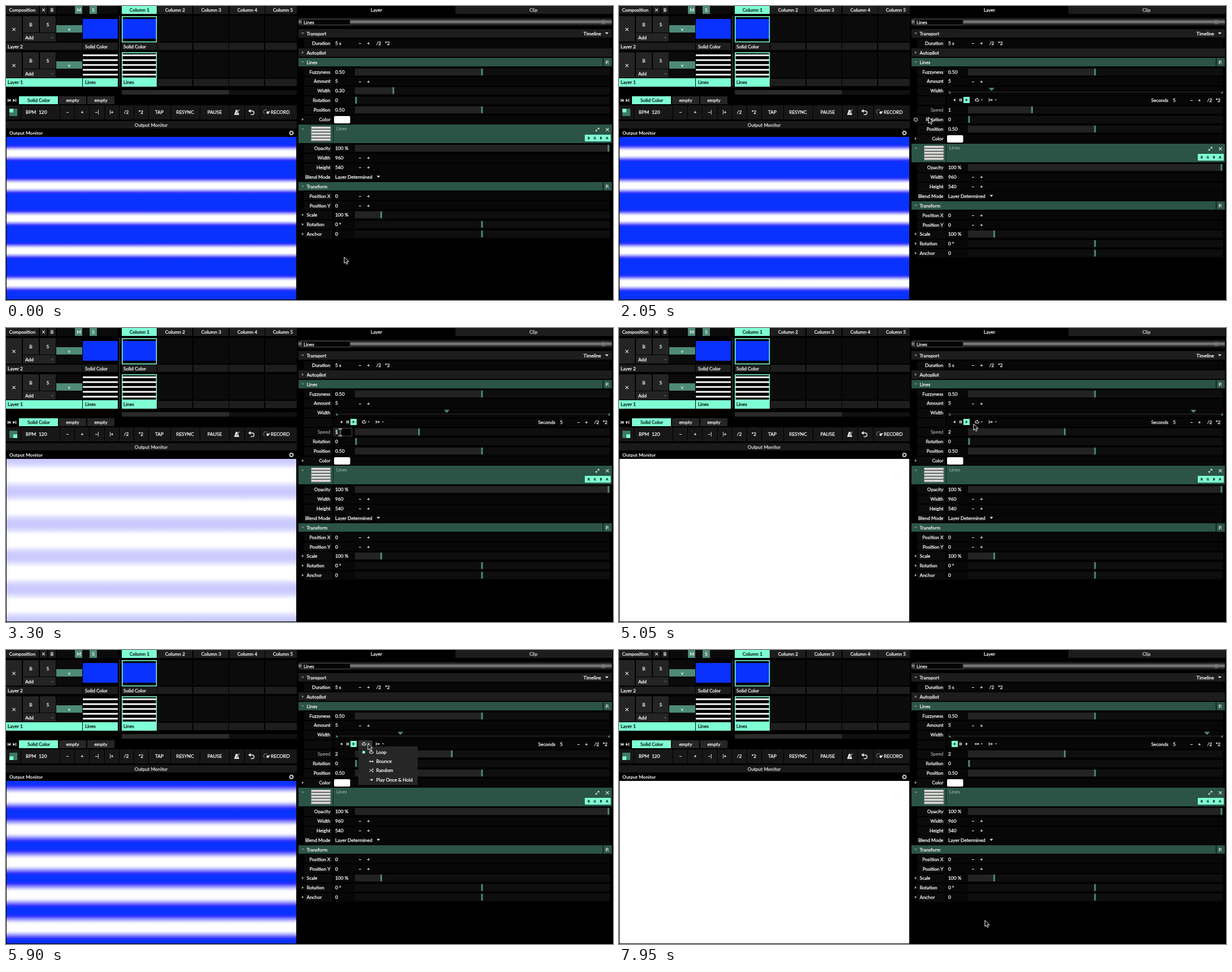
These frames come from a looping animation (1075 px wide and 521 px high, 8 s). An HTML page:

```html
<!DOCTYPE html>
<html lang="en">
<head>
<meta charset="utf-8">
<title>Line width animation</title>
<style>
  html, body { margin: 0; width: 100%; height: 100%; overflow: hidden; background: #000; }
  svg { display: block; }
  text {
    font: 8.35px Lato, "Open Sans", sans-serif;
    fill: currentColor; stroke: currentColor; stroke-width: .36px; white-space: pre;
  }
  .small { font-size: 5.6px; font-weight: 700; }
  .bold { font-weight: 700; font-size: 8.3px; stroke: none; }
</style>
</head>
<body>
<svg id="stage" width="1075" height="521" viewBox="0 0 1075 521"></svg>
<script>
const MINT = '#7fffd4', GREEN = '#4d8a77', HEAD = '#2b5446', GREY = '#1d1d1d', BUTTON = '#242424',
      WHITE = '#e8e8e8', DIM = '#8a8a8a', DARK = '#10241d', BLUE = '#0a32ff';
const LOOP = 8000, STEP = 50, SHIFT = 34;
const TIMELINE_ON = 2025, SPEED_UP = 4330, TURN = 7812, BOUNCE_ON = 6400;

// Drawing helpers
const box = (x, y, w, h, fill, extra = '') =>
  `<rect x="${x}" y="${y}" width="${w}" height="${h}" fill="${fill}" ${extra}/>`;
const label = (x, y, s, color = WHITE, anchor = 'start', cls = '') =>
  `<text x="${x}" y="${y + 3}" color="${color}" text-anchor="${anchor}" class="${cls}">${s}</text>`;
const mid = (x, y, s, color, cls) => label(x, y, s, color, 'middle', cls);
const path = (d, fill, extra = '') => `<path d="${d}" fill="${fill}" ${extra}/>`;
const line = (d, color = WHITE, w = 1) => path(d, 'none', `stroke="${color}" stroke-width="${w}"`);
const group = (id, s) => `<g id="${id}">${s}</g>`;
const down = (x, y, r, color) => path(`M${x - r} ${y - r * .6}h${2 * r}l${-r} ${r * 1.2}z`, color);
const right = (x, y, r, color) => path(`M${x - r * .6} ${y - r}v${2 * r}l${r * 1.4} ${-r}z`, color);
const left = (x, y, r, color) => path(`M${x + r * .6} ${y - r}v${2 * r}l${-r * 1.4} ${-r}z`, color);
const cross = (x, y, r) => line(`M${x - r} ${y - r}l${2 * r} ${2 * r}m0 ${-2 * r}l${-2 * r} ${2 * r}`, WHITE, 1.1);
const gear = (x, y, color) =>
  `<g fill="none" stroke="${color}"><circle cx="${x}" cy="${y}" r="2.6" stroke-width="1.3"/>` +
  `<circle cx="${x}" cy="${y}" r="3.7" stroke-width="1.2" stroke-dasharray="1.45"/></g>`;
const minusPlus = (y, x = 627, gap = 15) => mid(x, y, '−') + mid(x + gap, y, '+');
const swap = (x, y) => line(`M${x - 3} ${y}h6`) + left(x - 2.6, y, 2, WHITE) + right(x + 2.6, y, 2, WHITE);
const loopIcon = (x, y) => line(`M${x + 1} ${y - 2}h-2a2 2 0 0 0 0 4h2a2 2 0 0 0 2 -3`, WHITE, 1.2) +
  right(x + 1, y - 2, 1.8, WHITE);

// White share of the line pattern; d runs 0 at a line's centre to 1 halfway to the next
function edge(d, w) {
  const t = Math.min(1, Math.max(0, (d - .35 * w) / (1.55 * w + 1e-6)));
  return 1 - t * t * (3 - 2 * t);
}
const STOPS = 32;
function stops(w, rgb) {
  let s = '';
  for (let i = 0; i <= STOPS; i++) {
    const d = Math.abs(2 * i / STOPS - 1);
    const a = Math.min(1, edge(d, w) + edge(2 - d, w));
    const c = rgb.map(v => Math.round(Math.max(v, 255 * a)));
    s += `<stop offset="${i / STOPS}" stop-color="rgb(${c})"/>`;
  }
  return s;
}
const stripes = (id, y, h, w, rgb) =>
  `<linearGradient id="${id}" gradientUnits="userSpaceOnUse" x1="0" x2="0" y1="${y}" y2="${y + h / 5}"
    spreadMethod="repeat">${stops(w, rgb)}</linearGradient>`;

const defs = `<defs>${stripes('out', 232, 288, .3, [10, 50, 255])}${stripes('mini', 83, 43, .3, [0, 0, 0])}
  <linearGradient id="bar" x1="0" x2="0" y1="0" y2="1"><stop offset="0" stop-color="#000"/>
  <stop offset=".25" stop-color="#2c2c2c"/><stop offset=".5" stop-color="#888"/>
  <stop offset=".75" stop-color="#2c2c2c"/><stop offset="1" stop-color="#000"/></linearGradient></defs>`;

function layer(y, n, name, thumb, on) {
  const strip = on ? MINT : GREY, ink = on ? DARK : WHITE, ly = on ? y + 46 : y + 47, lh = on ? 15 : 13;
  let s = box(0, y, 28, 45, BUTTON) + cross(14, y + 23.5, 2.6) +
    box(30, y, 28, 29, BUTTON) + mid(44, y + 15, 'B') + box(60, y, 28, 29, BUTTON) + mid(74, y + 15, 'S') +
    box(30, y + 30, 58, 15, BUTTON) + label(34, y + 38, 'Add') + down(82, y + 38.5, 2.3, '#555') +
    box(89, y, 46, 45, '#0b0b0b') + box(89, y + 16, 46, 13, GREEN) + mid(112, y + 22.5, 'v') +
    box(0, ly, 135, lh, strip) + label(3, ly + 7, 'Layer ' + n, ink) +
    box(136, ly, 62, lh, strip) + label(140, ly + 7, name, ink) +
    box(205, ly, 62, lh, strip) + label(208, ly + 7, name, ink) + thumb(136) + thumb(205) +
    box(205.8, y + .8, 60.6, 44.8, 'none', `stroke="${MINT}" stroke-width="1.6"`);
  for (let i = 0; i < 4; i++) {
    const x = Math.round(268 + 63.7 * i), w = Math.min(62, 515 - x);
    s += box(x, y, w, 45, '#0b0b0b') + box(x, y + 47, w, 13, GREY);
  }
  return s;
}

function leftPanel() {
  let s = box(0, 0, 58, 14, GREY) + label(5.5, 7, 'Composition') + box(60, 0, 13, 14, GREY) +
    cross(66.5, 7, 2.3) + box(75, 0, 13, 14, GREY) + mid(81.5, 7, 'B') + box(90, 0, 108, 14, '#0b0b0b') +
    box(122, 0, 13, 14, GREEN) + mid(129, 7, 'M') + box(148, 0, 13, 14, GREEN) + mid(154.5, 7, 'S');
  for (let i = 0; i < 5; i++) {
    const x = Math.round(204.6 + 63.7 * i);
    s += box(x, 0, Math.min(62, 515 - x), 14, i ? GREY : MINT) + mid(x + 31.5, 7, 'Column ' + (i + 1), i ? WHITE : DARK);
  }
  s += layer(18, 2, 'Solid Color', x => box(x, 23, 62, 35, BLUE), false) +
    layer(82, 1, 'Lines', x => box(x, 83, 62, 43, 'url(#mini)'), true) +
    box(200, 17, 2, 126, '#242424') + box(205, 149, 310, 8, '#101010') + box(205, 149, 190, 8, '#2a2a2a');

  // Deck and tempo bars
  s += box(3, 164.5, 1.3, 5.5, WHITE) + left(6.4, 167.2, 2.8, WHITE) +
    right(14, 167.2, 2.8, WHITE) + box(16.8, 164.5, 1.3, 5.5, WHITE) +
    box(23, 160, 69, 14, MINT) + mid(58, 166.5, 'Solid Color', DARK);
  for (const x of [94, 144]) s += box(x, 160, 48, 14, '#262626') + mid(x + 24, 166.5, 'empty');
  s += box(0, 176, 515, 25, '#171717');
  for (const x of [26, 95, 121, 147, 174, 200, 226, 252, 291, 343, 395, 422, 450]) s += box(x, 176, 1, 25, '#000');
  s += box(6, 182, 14, 13, '#3c7a67') + `<rect id="beat" width="7" height="6.5" fill="${MINT}"/>` +
    label(35, 188, 'BPM') + label(58, 188, '120');
  ['−', '+', '−|', '|+', '/2', '*2'].forEach((c, i) => s += mid(109 + 26 * i, 188, c));
  s += mid(271.5, 188, 'TAP') + mid(317, 188, 'RESYNC') + mid(369.5, 188, 'PAUSE') + label(469, 188, 'RECORD') +
    path('M404 193l3-9h3l3 9z', WHITE) + line('M408 191l5-7', '#171717', 1.8) + line('M408 191l5.5-7.5') +
    line('M432 186h4a3.2 3.2 0 0 1 0 6.5h-2.5', WHITE, 1.5) + left(431.5, 186, 3.2, WHITE) +
    line('M458.5 191a3.7 3.7 0 1 1 4-6', '#555', 1.6) + path('M461 188.5h6v-3l-2 2-2-1z', WHITE) +
    `<circle cx="463.5" cy="189" r="2.2" fill="${WHITE}"/>`;

  return s + box(0, 204, 515, 13, '#191919') + mid(257, 210.5, 'Output Monitor', '#cfcfcf') +
    label(6, 225, 'Output Monitor', '#fff', 'start', 'bold') + gear(505.5, 225, WHITE) +
    box(1, 232, 513, 288, 'url(#out)');
}

const rowBack = y => box(528, Math.floor(y - 7), 50, 15, '#0b0b0b') + box(580, Math.floor(y - 7), 490, 15, '#070707');
const row = (y, name, value, color) => rowBack(y) + label(574.5, y, name, color, 'end') + label(583, y, value);
const handle = (x, y) => box(x - 1.5, y - 6, 3, 12, GREEN);
const track = (y, x, fillTo = x) => box(618, y - 6, 451, 12, '#0e0e0e') +
  box(618, y - 6, fillTo - 618, 12, '#232323') + handle(x, y);
function header(y, name, color, open) {
  const top = Math.floor(y - 7);
  return box(518, top, 555, 15, color) + (open ? down : right)(525.5, y, 2.6, '#76857f') + label(532.5, y, name) +
    (color === HEAD ? box(1057, top, 1, 15, '#000') + mid(1065, y, 'P.') : '');
}
const fold = (y, name, value) => rowBack(y) + right(525.5, y, 2.6, '#999') +
  label(532.5, y, name) + label(583, y, value);

function lowerRows() {
  let s = row(167, 'Rotation', '0') + track(167, 620) + row(184, 'Position', '0.50') + track(184, 843) +
    row(201, 'Color', '') + right(525.5, 201, 2.6, '#999') + box(581, 195, 28.5, 13, '#fff', 'rx="2"');
  s += box(518, 210, 555, 33, HEAD) + down(525.5, 218.5, 2.6, '#76857f') + box(540, 213, 35.5, 27, '#6f7a76');
  for (let i = 0; i < 5; i++) s += box(541, 214.3 + 5.3 * i, 33.5, 2.6, '#f0e8e8');
  s += box(579, 210, 1, 33, '#12271f') + label(585, 217, 'Lines', '#7d9a8f') +
    line('M1044.8 221.5l5-5') + path('M1047.3 215.8h3.4v3.4zM1044 218.9v3.4h3.4z', WHITE) + cross(1065, 219, 2.7) +
    box(1025, 228, 46, 12, MINT, 'rx="1"');
  ['R', 'G', 'B', 'A'].forEach((c, i) => s += mid(1032 + 10.8 * i, 233, c, DARK, 'small'));
  s += row(252, 'Opacity', '100 %') + track(252, 1067) +
    row(269, 'Width', '960') + minusPlus(269) + row(286, 'Height', '540') + minusPlus(286) +
    row(302.5, 'Blend Mode', 'Layer Determined') + down(659.5, 302.5, 3, WHITE) +
    header(319.5, 'Transform', HEAD, true) +
    row(336.5, 'Position X', '0') + minusPlus(337) + row(353.5, 'Position Y', '0') + minusPlus(354) +
    fold(370, 'Scale', '100 %') + track(370, 664.5) +
    fold(387, 'Rotation', '0 °') + track(387, 843, 618) + fold(404, 'Anchor', '0') + track(404, 843, 618);
  return s;
}

function timelineRows() {
  return row(150, 'Width', '') + box(585, 152, 484, 1, '#2b2b2b') +
    path('M584.5 150v5h4zM1069.5 150v5h-4z', GREEN) +
    group('marker', path('M-5 145h10l-5 5.5z', GREEN)) + rowBack(167) +
    group('forward', box(610, 161, 11, 11, MINT) + right(615.5, 166.5, 2.5, DARK) + left(594, 166.5, 2.5, WHITE)) +
    group('backward', box(589, 161, 11, 11, MINT) + left(594, 166.5, 2.5, DARK) + right(615.5, 166.5, 2.5, WHITE)) +
    box(603, 164, 1.5, 5, WHITE) + box(605.6, 164, 1.5, 5, WHITE) +
    group('hover', box(624, 160, 25, 13, '#333')) +
    group('modeLoop', loopIcon(634, 166.5)) + group('modeBounce', swap(634, 166.5)) + down(642.5, 166.5, 1.5, WHITE) +
    line('M655.5 163.5v6m0-3h5') + right(660.5, 166.5, 2, WHITE) + down(667.5, 166.5, 1.5, WHITE) +
    label(942.5, 166.5, 'Seconds') + label(981, 166.5, '5') + minusPlus(166.5, 1014, 14) +
    mid(1046, 166.5, '/2') + mid(1061, 166.5, '*2') +
    row(184, 'Speed', '', DIM) +
    group('slow', track(184, 731.5)) + group('fast', track(184, 789.5)) +
    group('edit', box(580.5, 177.5, 32, 14, '#000', 'stroke="#4a4a4a"') +
      `<rect id="select" x="582.5" y="179" width="6" height="10.5" fill="#2f4d58"/>`) +
    `<text id="speed" x="583" y="187" color="${WHITE}">1</text>`;
}

function widthMenu() {
  let s = box(522, 152, 108, 202, '#262626') + label(541.5, 161.5, 'Width', DIM) +
    `<circle cx="532.5" cy="184.5" r="2.8" fill="${MINT}"/>`;
  ['Basic', 'Timeline', 'BPM Sync', 'Dashboard', 'Clip Position', 'Clip FFT', 'External FFT', 'Composition FFT']
    .forEach((c, i) => s += label(542, 184 + 16.2 * i, c));
  for (const y of [173, 309, 332]) s += box(522, y, 108, 1, '#3a3a3a');
  return s + label(542, 321, 'Envelope') + label(542, 344, 'Animation Settings', '#666') + right(618, 344, 2.3, '#777');
}

function modeMenu() {
  let s = box(624, 171, 105, 68, '#262626') + `<circle cx="633.5" cy="181" r="2.6" fill="${MINT}"/>`;
  ['Loop', 'Bounce', 'Random', 'Play Once &amp; Hold'].forEach((c, i) => s += label(655.5, 181 + 16.2 * i, c));
  return s + loopIcon(647, 181) + swap(647, 197.5) +
    line('M643.5 211.5h1.5l3.5 4h1.5m-6.5 0h1.5l3.5-4h1.5') + right(650, 211.5, 1.6, WHITE) + right(650, 215.5, 1.6, WHITE) +
    line('M644 230h4') + right(648.5, 230, 2.3, WHITE);
}

function rightPanel() {
  return mid(656, 7, 'Layer') + box(796, 0, 278, 14, GREY) + mid(934, 7, 'Clip', '#cfcfcf') +
    box(518, 20, 555, 16, 'url(#bar)') + box(523.5, 23.5, 86, 10, '#050505', 'stroke="#4a4a4a"') +
    label(527, 28.5, 'Lines') + gear(1058, 28.5, '#777') +
    header(48.5, 'Transport', GREY, true) + label(1054, 48.5, 'Timeline', WHITE, 'end') + down(1064, 48.5, 3, WHITE) +
    row(66, 'Duration', '5 s') + minusPlus(66) + mid(660, 66, '/2') + mid(675.5, 66, '*2') +
    header(82.5, 'Autopilot', GREY, false) + header(99.5, 'Lines', HEAD, true) +
    row(116.5, 'Fuzzyness', '0.50') + track(117, 843) + row(133, 'Amount', '5') + minusPlus(133.5) +
    group('basic', row(150, 'Width', '0.30') + track(150, 686)) + group('timeline', timelineRows()) +
    group('lower', lowerRows()) + group('rowGear', gear(525.5, 201.5, '#999')) +
    group('menu', widthMenu()) + group('modes', modeMenu());
}

const BEAM = 'M-3-6q3 0 3 2v8q0 2-3 2m6-12q-3 0-3 2v8q0 2 3 2';
const cursors = group('arrow', path('M0 0v11l2.5-2.3 1.8 4 2-1-1.8-3.8h3.6z', '#000', 'stroke="#fff"')) +
  group('beam', line(BEAM, '#fff', 2.4) + line(BEAM, '#000', .9));

document.getElementById('stage').innerHTML = defs + leftPanel() + rightPanel() + cursors;

// Pointer stops: time, x, y
const route = [[0, 599, 445], [200, 599, 445], [1000, 522, 151], [1300, 522, 151], [1900, 548, 197],
  [2450, 548, 197], [3000, 592, 185], [4400, 592, 185], [5000, 628, 170], [5100, 628, 170], [5400, 641, 166],
  [5950, 641, 166], [6300, 662, 195], [6450, 662, 195], [7350, 648, 479], [LOOP, 648, 479]];

function pointer(t) {
  const i = route.findIndex(p => p[0] > t), [t0, x0, y0] = route[i - 1], [t1, x1, y1] = route[i];
  const u = (t - t0) / (t1 - t0), e = u * u * (3 - 2 * u);
  return [x0 + (x1 - x0) * e, y0 + (y1 - y0) * e];
}

function playhead(t) {
  if (t < SPEED_UP) return .15 + (t - TIMELINE_ON) / 5000;
  const p = .235 + (t - 5900) / 2500;
  if (t > TURN) return 2 - p;
  return (p + 1) % 1;
}

const $ = id => document.getElementById(id);
const show = (id, on) => $(id).setAttribute('display', on ? 'inline' : 'none');
const move = (id, x, y) => $(id).setAttribute('transform', `translate(${x} ${y})`);
let last = -1;

function draw(t) {
  const timed = t >= TIMELINE_ON, editing = t >= 3150 && t < SPEED_UP, fast = t >= SPEED_UP;
  const p = timed ? playhead(t) : .15, [x, y] = pointer(t), beat = Math.floor(t / 500) % 4;
  $('out').innerHTML = stops(2 * p, [10, 50, 255]);
  move('marker', 585 + 483 * p, 0);
  move('lower', 0, timed ? SHIFT : 0);
  show('basic', !timed);
  show('timeline', timed);
  show('menu', t >= 1100 && t < TIMELINE_ON);
  show('modes', t >= 5500 && t < BOUNCE_ON);
  show('hover', t >= 5300 && t < BOUNCE_ON);
  show('modeLoop', t < BOUNCE_ON);
  show('modeBounce', t >= BOUNCE_ON);
  show('forward', t < TURN);
  show('backward', t >= TURN);
  show('rowGear', timed && y > 193 && y < 210 && x < 575);
  show('slow', !fast);
  show('fast', fast);
  show('edit', editing);
  show('select', t < 4000);
  $('speed').textContent = t < 4000 ? '1' : '2';
  show('arrow', !editing);
  show('beam', editing);
  move('arrow', x, y);
  move('beam', x, y);
  move('beat', beat === 1 || beat === 2 ? 13 : 6, beat > 1 ? 188.5 : 182);
}

function tick() {
  const t = Math.floor(performance.now() % LOOP / STEP) * STEP;
  if (t !== last) draw(last = t);
  requestAnimationFrame(tick);
}
tick();
</script>
</body>
</html>
```
